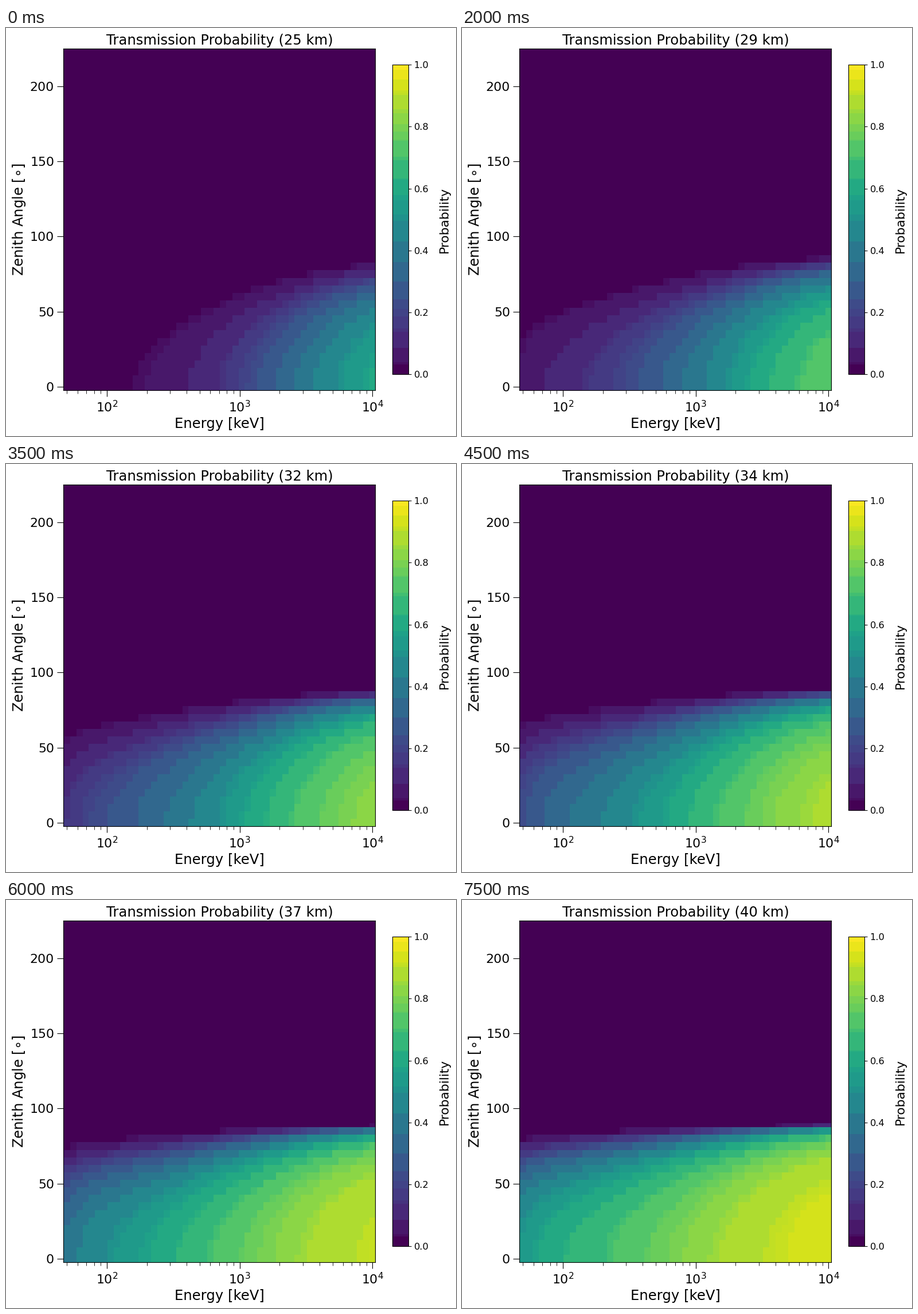
Recreate the animation shown at these times as a matplotlib script. Size 785 by 713 pixels, loop 8 s.

```python
import math
import numpy as np
import matplotlib.pyplot as plt
from matplotlib.animation import FuncAnimation
from matplotlib.colors import ListedColormap
from matplotlib.ticker import NullFormatter

W, H, DPI = 785, 713, 100
PX = 72 / DPI  # points per pixel
EARTH = 6371.0  # km

plt.rcParams["font.family"] = "DejaVu Sans"


def attenuation(kev):
    """Photon attenuation in air (cm^2/g): Compton, photoelectric, pairs."""
    k = kev / 511
    a, log = 1 + 2 * k, np.log(1 + 2 * k)
    compton = 0.15 * ((1 + k) / k**2 * (2 * (1 + k) / a - log / k)
                      + log / (2 * k) - (1 + 3 * k) / a**2)
    photo = 0.0392 * (kev / 50) ** -2.71
    pairs = 0.0011 * np.log(np.maximum(kev / 1022, 1)) ** 1.86
    return compton + photo + pairs


def column(h):
    """Overhead air (g/cm^2) and scale height (km) at altitude h."""
    z = 6356.77 * h / (6356.77 + h)
    if z < 32:
        p0, t0, z0, lapse = 54.75, 216.65, 20, 1
    else:
        p0, t0, z0, lapse = 8.68, 228.65, 32, 4
    t = t0 + lapse * (z - z0)
    p = p0 * (t / t0) ** (-34.163 / lapse)
    return 1.0197 * p * (1 + 2 * h / EARTH), 0.0293 * t


def slant(theta, x):
    """Chapman grazing function; blocked below the horizon."""
    if theta > 90:
        return np.inf
    u = math.sqrt(x / 2) * math.cos(math.radians(theta))
    return math.sqrt(math.pi * x / 2) * math.exp(u * u) * math.erfc(u)


energy = np.geomspace(50, 1e4, 50)
zenith = np.append(np.arange(0, 91, 5), [90.2, 180])
mu = attenuation(energy)


def transmission(h):
    depth, scale = column(h)
    path = np.array([slant(a, (EARTH + h) / scale) for a in zenith])
    return np.exp(-depth * np.outer(path, mu))


def edges(c):
    mid = (c[1:] + c[:-1]) / 2
    return np.concatenate([[2 * c[0] - mid[0]], mid, [2 * c[-1] - mid[-1]]])


def banded_viridis():
    """Viridis averaged over coarse RGB cells, which gives uneven bands."""
    rgb = np.rint(np.array(plt.get_cmap("viridis").colors) * 255).astype(int)
    key = (rgb // [32, 16, 32]) @ [256, 16, 1]
    out = np.array([rgb[key == k].mean(axis=0) for k in key])
    out[key == key[0]] = rgb[0]
    return ListedColormap(out / 255)


def px_axes(x0, y0, x1, y1):
    return fig.add_axes([x0 / W, 1 - y1 / H, (x1 - x0) / W, (y1 - y0) / H])


def label(x, y, s, size, rotation=0):
    return fig.text(x / W, 1 - y / H, s, fontsize=size * PX, rotation=rotation,
                    rotation_mode="anchor", ha="center", va="baseline")


fig = plt.figure(figsize=(W / DPI, H / DPI), dpi=DPI, facecolor="white")

ax = px_axes(100.3, 36.45, 644.3, 633.4)
ex, ey = edges(energy), edges(zenith)
mesh = ax.pcolormesh(ex, ey, transmission(25), cmap=banded_viridis(),
                     vmin=0, vmax=1)
ax.set_xscale("log")
ax.set_xlim(ex[0], ex[-1])
ax.set_ylim(ey[0], ey[-1])
ax.set_yticks(range(0, 201, 50))
ax.xaxis.set_minor_formatter(NullFormatter())
ax.tick_params(which="major", length=11 * PX, width=0.8, pad=5.2 * PX,
               labelsize=22 * PX)
ax.tick_params(which="minor", length=6 * PX, width=0.6)

cax = px_axes(674.3, 64.3, 702.2, 605.2)
cbar = fig.colorbar(mesh, cax=cax, ticks=np.linspace(0, 1, 6))
cbar.ax.tick_params(length=5 * PX, width=0.8, pad=4.5 * PX,
                    labelsize=16.3 * PX)

title = label(372.5, 29, "", 24.3)
label(372.5, 699, "Energy [keV]", 24.3)
label(30, 335, r"Zenith Angle [$\circ$]", 24.3, 90)
label(771, 335, "Probability", 21.8, 90)


def draw(i):
    h = 25 + i
    mesh.set_array(transmission(h))
    title.set_text(f"Transmission Probability ({h} km)")
    return mesh, title


anim = FuncAnimation(fig, draw, frames=16, interval=500, repeat=True,
                     repeat_delay=0)
plt.show()
```
